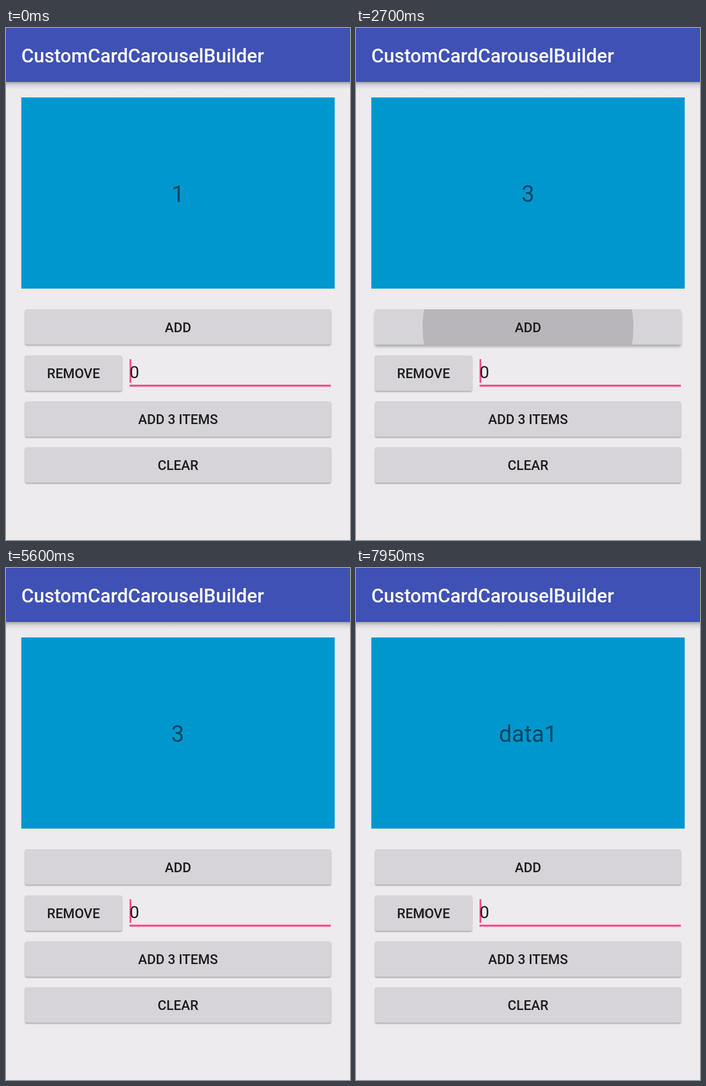
These frames come from a looping animation (600 by 892 pixels, 8 s). An HTML page:

```html
<!DOCTYPE html>
<html lang="en">
<head>
<meta charset="utf-8">
<title>Pager demo</title>
<style>
  html, body { margin: 0; width: 100%; height: 100%; overflow: hidden; background: #edebee; }
  svg { display: block; width: 100%; height: 100%; font-family: Roboto, sans-serif; }
  .title { font-size: 33.33px; font-weight: 500; fill: #fff; }
  .label { font-size: 23.33px; font-weight: 500; fill: #1c1b1c; text-anchor: middle; }
  .field { font-size: 30px; fill: #1f1e1f; }
  .page { font-size: 40px; fill: #000; fill-opacity: .54; text-anchor: middle; }
  .face { fill: #d6d4d8; filter: drop-shadow(0 2px 1.2px rgba(0, 0, 0, .27)); }
</style>
</head>
<body>
<svg id="stage" viewBox="0 0 600 892">
  <defs>
    <linearGradient id="shade" x2="0" y2="1">
      <stop offset="0" stop-color="#000" stop-opacity=".3"/>
      <stop offset=".4" stop-color="#000" stop-opacity=".1"/>
      <stop offset="1" stop-color="#000" stop-opacity="0"/>
    </linearGradient>
    <clipPath id="pagerClip"><rect x="26.67" y="121" width="546.67" height="333"/></clipPath>
  </defs>
  <rect width="600" height="892" fill="#edebee"/>
  <rect y="94" width="600" height="13" fill="url(#shade)"/>
  <rect width="600" height="94" fill="#3f51b5"/>
  <rect width="600" height="1" fill="#38489f"/>
  <text class="title" x="26.67" y="60">CustomCardCarouselBuilder</text>

  <g clip-path="url(#pagerClip)">
    <rect x="26" y="121" width="548" height="333" fill="#0097ce"/>
    <text class="page" id="leaving" y="303"></text>
    <text class="page" id="current" y="303"></text>
    <ellipse id="glow" cy="287.5" ry="500" fill="#3f51b5"/>
  </g>

  <g id="buttons"></g>

  <rect x="215.5" y="621.5" width="351" height="3.3" fill="#ff4081"/>
  <rect id="cursor" x="215.5" y="577" width="3" height="41" fill="#ff4081"/>
  <text class="field" x="215.5" y="610">0</text>
</svg>
<script>
const LOOP = 8000, PAGE_WIDTH = 546.67;
const $ = id => document.getElementById(id);
const clamp = x => Math.min(1, Math.max(0, x));
const set = (el, attrs) => { for (const k in attrs) el.setAttribute(k, attrs[k]); };

// dir is the swipe direction; entries without one swap the page in place
const pages = [
  { at: 0, text: '1' },
  { at: 890, text: '2' },
  { at: 1270, text: '3', dur: 430, dir: -1 },
  { at: 3170, text: 'data1', dur: 530, dir: -1 },
  { at: 5270, text: '3', dur: 430, dir: 1 },
  { at: 5700, text: '2', dur: 400, dir: 1 },
  { at: 6980, text: '3' },
  { at: 7940, text: 'data1' }
];
const glows = [
  { at: 1870, side: 1, alpha: .52 },
  { at: 3880, side: 1, alpha: .62 },
  { at: 6130, side: -1, alpha: .38 }
];
const buttons = [
  { text: 'ADD', y: 490, width: 534, taps: [2600] },
  { text: 'REMOVE', y: 570.5, width: 169.5, taps: [890, 6980, 7940] },
  { text: 'ADD 3 ITEMS', y: 650.5, width: 534, taps: [] },
  { text: 'CLEAR', y: 730.5, width: 534, taps: [] }
];

buttons.forEach((b, i) => {
  const cx = 33 + b.width / 2;
  const box = `x="33" y="${b.y}" width="${b.width}" height="61.5" rx="3.3"`;
  $('buttons').insertAdjacentHTML('beforeend', `
    <clipPath id="clip${i}"><rect ${box}/></clipPath>
    <rect class="face" ${box}/>
    <g clip-path="url(#clip${i})"><circle cx="${cx}" cy="${b.y + 31}" r="0"/></g>
    <text class="label" x="${cx}" y="${b.y + 39.7}">${b.text}</text>`);
  const group = $('buttons');
  b.ripple = group.querySelectorAll('circle')[i];
  b.face = group.querySelectorAll('.face')[i];
});

function drawPages(t) {
  const i = pages.findLastIndex(p => t >= p.at);
  const { at, text, dur, dir } = pages[i];
  const x = dir ? clamp((t - at) / dur) : 1;
  const rest = (1 - x * x) ** 8 * PAGE_WIDTH;
  $('current').textContent = text;
  set($('current'), { x: 300 - (dir || 0) * rest });
  $('leaving').textContent = dir && x < 1 ? pages[i - 1].text : '';
  set($('leaving'), { x: 300 + (dir || 0) * (PAGE_WIDTH - rest) });
}

function drawGlow(t) {
  const g = glows.find(g => t >= g.at && t < g.at + 760);
  if (!g) return set($('glow'), { rx: 0, opacity: 0 });
  const age = t - g.at;
  const rise = 1 - (1 - clamp(age / 160)) ** 2;
  const level = rise * (1 - clamp((age - 160) / 600)) ** 2;
  const scale = .85 * level;
  set($('glow'), {
    cx: 300 + g.side * (PAGE_WIDTH / 2 + 433 * scale),
    rx: 500 * scale,
    opacity: g.alpha * level
  });
}

function drawButton(b, t) {
  const tap = b.taps.find(at => t >= at && t < at + 450);
  const age = tap === undefined ? 450 : t - tap;
  const spread = 1 - (1 - clamp(age / 260)) ** 2;
  const fade = 1 - clamp((age - 150) / 300);
  const lift = Math.min(clamp(age / 100), fade);
  set(b.ripple, { r: age < 450 ? b.width * .55 * spread : 0, opacity: .14 * fade });
  b.face.style.filter = lift
    ? `drop-shadow(0 ${2 + 2 * lift}px ${1.2 + lift}px rgba(0, 0, 0, .27))` : '';
}

function draw(now) {
  const t = now % LOOP;
  drawPages(t);
  drawGlow(t);
  buttons.forEach(b => drawButton(b, t));
  const cursorOn = t < 50 || (t >= 555 && Math.floor((t - 555) / 498) % 2 === 0);
  set($('cursor'), { opacity: cursorOn ? 1 : 0 });
}

const start = performance.now();
function tick() {
  draw(performance.now() - start);
  requestAnimationFrame(tick);
}
tick();
</script>
</body>
</html>
```
